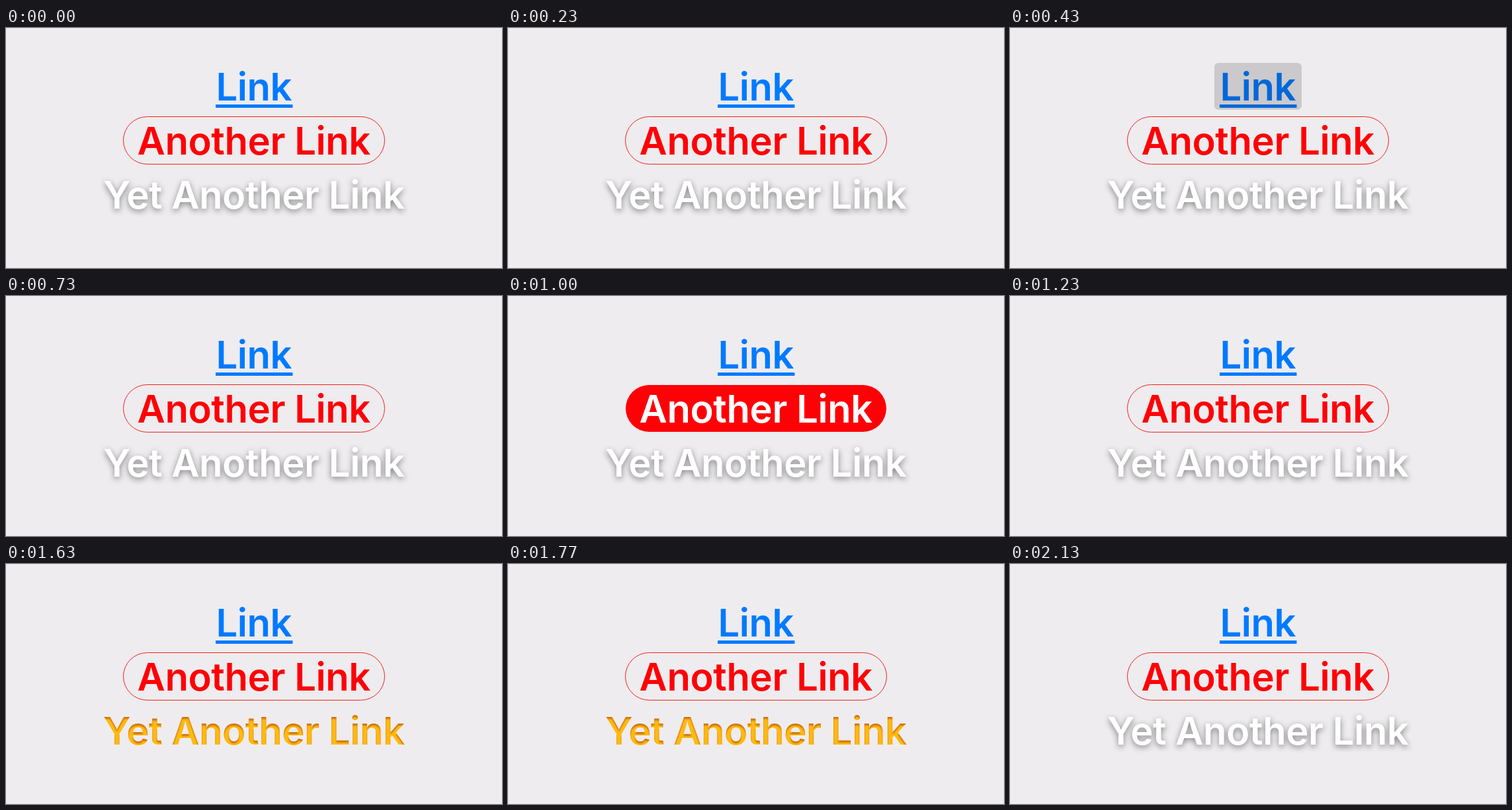
An HTML page that plays this animation: 750x364 px, repeating every 2.16 s.

```html
<!DOCTYPE html>
<html lang="en">
<head>
<meta charset="utf-8">
<title>Link styles</title>
<style>
  html, body { margin: 0; width: 100%; height: 100%; overflow: hidden; background: #eeecef; }
  svg { display: block; }
  text {
    font: 600 58px Inter, "Liberation Sans", sans-serif;
    font-optical-sizing: none;
    letter-spacing: -.43px;
    text-anchor: middle;
  }
  #pill { stroke: #f0201c; fill: none; }
  #pillText { fill: #ff0006; }
  .pressed #pill { fill: #ff0006; stroke: #eeecef; }
  .pressed #pillText { fill: #fff; }
  #raised { fill: #fff; filter: drop-shadow(0 3px 5px rgba(0, 0, 0, .46)); }
  #engraved { fill: #ffba12; filter: url(#letterpress); }
</style>
</head>
<body>
<svg width="750" height="364" viewBox="0 0 750 364">
  <defs>
    <filter id="letterpress" x="-5%" y="-20%" width="110%" height="140%" color-interpolation-filters="sRGB">
      <feOffset in="SourceAlpha" dy="2.5"/>
      <feGaussianBlur stdDeviation="1" result="inset"/>
      <feFlood flood-color="#b85010" flood-opacity=".7"/>
      <feComposite in2="SourceAlpha" operator="in"/>
      <feComposite in2="inset" operator="out" result="shade"/>
      <feFlood flood-color="#fff" flood-opacity=".6"/>
      <feComposite in2="SourceAlpha" operator="in"/>
      <feOffset dy="1" result="rim"/>
      <feMerge>
        <feMergeNode in="rim"/>
        <feMergeNode in="SourceGraphic"/>
        <feMergeNode in="shade"/>
      </feMerge>
    </filter>
  </defs>

  <g fill="#007aff">
    <text x="374.8" y="110">Link</text>
    <rect x="317" y="116" width="116.5" height="5"/>
  </g>
  <rect id="highlight" x="309" y="53" width="132" height="71" rx="6" fill-opacity=".15"/>

  <g id="button">
    <rect id="pill" x="177.5" y="134.5" width="395" height="72" rx="36"/>
    <text id="pillText" x="374.8" y="192">Another Link</text>
  </g>

  <text id="raised" x="374.8" y="274">Yet Another Link</text>
  <text id="engraved" x="374.8" y="274">Yet Another Link</text>
</svg>
<script>
  const LOOP = 2160;
  const el = id => document.getElementById(id);
  const show = (id, on) => { el(id).style.display = on ? "" : "none"; };

  // Each link is held down for one span of the loop, with hard switches.
  function draw(now) {
    const t = now % LOOP;
    const held = (from, to) => t >= from && t < to;
    const third = held(1410, 1840);
    show("highlight", held(320, 530));
    el("button").classList.toggle("pressed", held(900, 1080));
    show("raised", !third);
    show("engraved", third);
  }

  const start = performance.now();
  function tick() {
    draw(performance.now() - start);
    requestAnimationFrame(tick);
  }
  tick();
</script>
</body>
</html>
```
